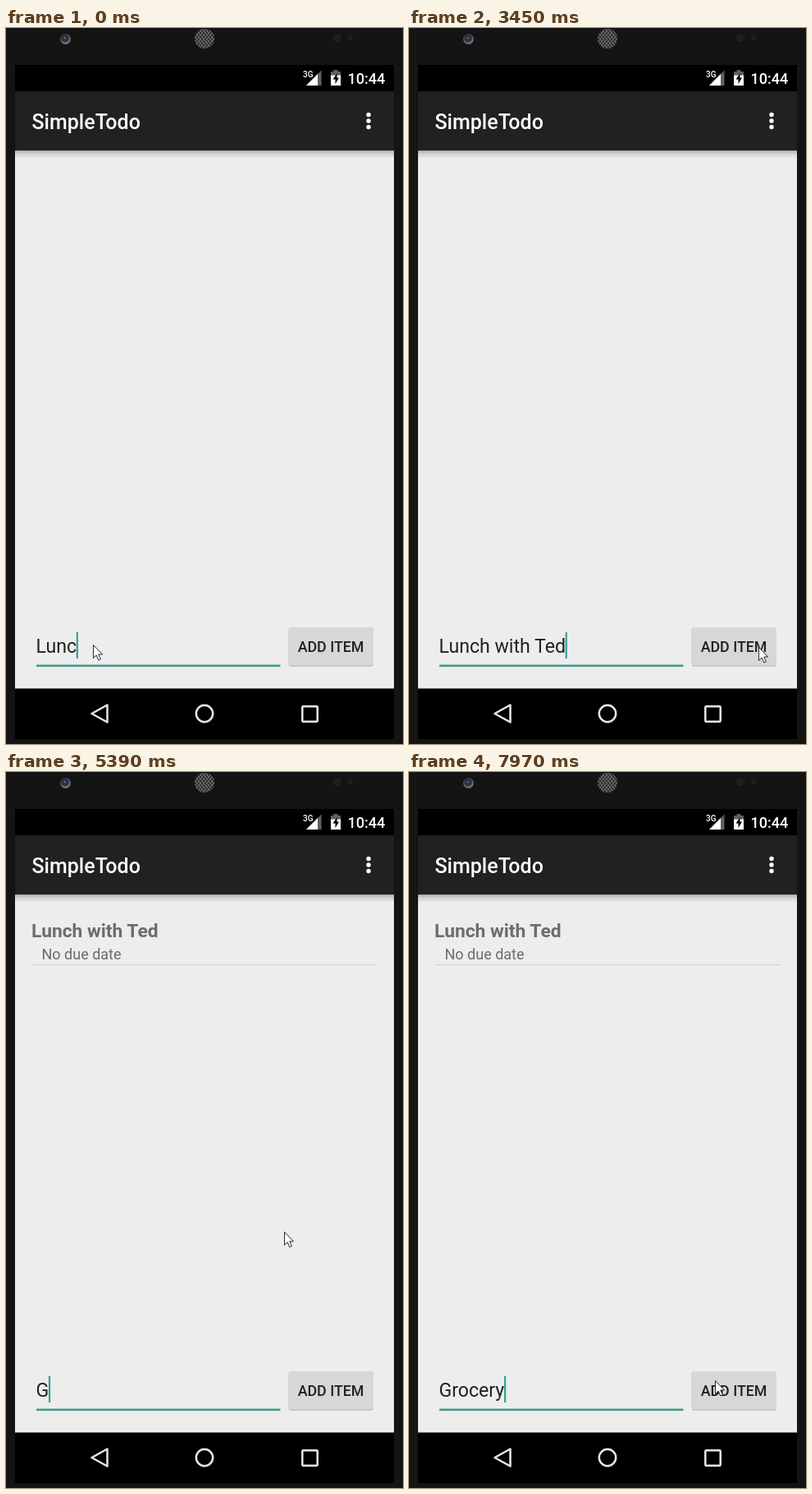
Recreate the animation shown at these times as an HTML page. Size 484 by 871 pixels, loop 8 s.

```html
<!DOCTYPE html>
<html lang="en">
<head>
<meta charset="utf-8">
<title>SimpleTodo</title>
<style>
html, body { margin: 0; width: 100%; height: 100%; overflow: hidden; background: #141414; }
svg { display: block; width: 484px; height: 871px; }
text { font-family: Roboto, "Noto Sans", sans-serif; white-space: pre; }
.medium { font-weight: 500; }
.field { font-size: 23.1px; }
</style>
</head>
<body>
<svg viewBox="0 0 484 871">
  <defs>
    <linearGradient id="shade" x2="0" y2="1">
      <stop stop-color="#aaa"/><stop offset=".4" stop-color="#d2d2d2"/><stop offset="1" stop-color="#ededed"/>
    </linearGradient>
    <radialGradient id="lens" cx=".45" cy=".4">
      <stop stop-color="#7474b4"/><stop offset=".35" stop-color="#26264a"/>
      <stop offset=".65" stop-color="#333"/><stop offset="1" stop-color="#77756f"/>
    </radialGradient>
    <pattern id="mesh" width="4" height="5" patternUnits="userSpaceOnUse">
      <path d="M0 0h4v5h-4z" fill="#646464"/>
      <g fill="#222"><circle cx="1" cy="1.2" r="1.15"/><circle cx="3" cy="3.7" r="1.15"/></g>
    </pattern>
  </defs>

  <!-- Phone body -->
  <rect width="484" height="871" fill="#141414"/>
  <circle cx="72.5" cy="13.5" r="6.3" fill="url(#lens)"/>
  <circle cx="242" cy="13" r="12" fill="url(#mesh)"/>
  <circle cx="404" cy="12" r="5" fill="#1f1f1f"/>
  <circle cx="420" cy="12" r="3" fill="#202020"/>

  <!-- Status bar and title bar -->
  <rect x="11" y="45" width="462" height="820"/>
  <text class="medium" x="362" y="60" font-size="10" fill="#fff">3G</text>
  <path d="M366 70L384.5 51.5V70z" fill="#606060"/>
  <path d="M366 70L380 56V70z" fill="#fff"/>
  <path d="M396 53h3.5v-2h5v2h3.5v5h-12z" fill="#606060"/>
  <path d="M396 57.5h12V70h-12z" fill="#fff"/>
  <path d="M403.5 55l-5 7.5h3v5.5l4.5-7.5h-2.5z"/>
  <text class="medium" x="416.5" y="68" font-size="18" fill="#fff">10:44</text>
  <rect x="11" y="77" width="462" height="72" fill="#212121"/>
  <text class="medium" x="31.5" y="122.5" font-size="25" fill="#fff">SimpleTodo</text>
  <g fill="#fff"><circle cx="442" cy="105.5" r="2.7"/><circle cx="442" cy="113" r="2.7"/><circle cx="442" cy="120.5" r="2.7"/></g>

  <!-- Content -->
  <rect x="11" y="149" width="462" height="654.5" fill="#ededed"/>
  <rect x="11" y="149" width="462" height="10" fill="url(#shade)"/>
  <g id="item" fill="#6c6c6c">
    <text x="31" y="200.5" font-size="22.8" font-weight="700">Lunch with Ted</text>
    <text x="43.5" y="227.5" font-size="18">No due date</text>
    <path d="M31.5 234.5H452.5" stroke="#d2d2d2"/>
  </g>
  <text id="hint" class="field" x="36.5" y="760" fill="#7c7c7c">New Item Here</text>
  <text id="typed" class="field" x="36.5" y="760" fill="#212121"></text>
  <rect x="37" y="774.5" width="297.5" height="2.6" fill="#45998d"/>
  <rect id="caret" y="735" width="2.2" height="32" fill="#36a195"/>
  <rect id="glow" x="344" y="731" width="104.5" height="47.5" rx="3" fill="#bbb"/>
  <rect x="344.5" y="730" width="103.5" height="46.8" rx="3" fill="#bdbdbd"/>
  <rect id="button" x="344.5" y="729" width="103.5" height="46.5" rx="3"/>
  <text class="medium" x="396" y="759" font-size="17.8" text-anchor="middle" fill="#202020">ADD ITEM</text>

  <!-- Navigation bar -->
  <g fill="none" stroke="#e6e6e6" stroke-width="2.5" stroke-linejoin="round">
    <path d="M104.5 834L123.5 823.5V844.5z"/>
    <circle cx="242" cy="834" r="10.2"/>
    <rect x="361.3" y="825.3" width="18.4" height="18.4" rx="1"/>
  </g>

  <path id="pointer" d="M.5 .5V16.5L4.2 13L6.8 19L9.4 17.8L6.8 12H11.5z" fill="#fff" stroke="#25253a" stroke-linejoin="round"/>
</svg>
<script>
const LOOP = 8000;
const $ = id => document.getElementById(id);
const [item, hint, typed, caret, glow, button, pointer] =
  ["item", "hint", "typed", "caret", "glow", "button", "pointer"].map($);

// Each track lists [start in ms, value]; values hold until the next start.
const typing = [
  [0, "Lunc"], [150, "Lunch"], [300, "Lunch "], [580, "Lunch w"], [730, "Lunch wit"],
  [1040, "Lunch with"], [1350, "Lunch with "], [1900, "Lunch with T"],
  [2200, "Lunch with Te"], [2480, "Lunch with Ted"], [3980, ""],
  [5390, "G"], [5670, "Gr"], [5950, "Gro"], [6070, "Groc"],
  [6350, "Groce"], [6470, "Grocer"], [6740, "Grocery"]
];
const caretShown = [
  [0, true], [1750, false], [1900, true], [2910, false], [3320, true],
  [4560, false], [4990, true], [7270, false], [7680, true]
];
const moves = [
  [0, [106, 750]], [2910, [150, 690]], [3050, [235, 656]], [3190, [330, 760]],
  [3320, [395, 853]], [3450, [426, 753]], [4120, [390, 665]], [4260, [346, 573]],
  [4410, [339, 559]], [7400, [345, 590]], [7540, [362, 665]],
  [7680, [379, 735]], [7970, [373, 740]]
];
const buttonFill = [
  [0, "#d6d7d7"], [3840, "#c9caca"], [4410, "#d0d1d1"], [4560, "#d6d7d7"]
];

const at = (track, t) => track.findLast(([start]) => start <= t)[1];
const show = (el, on) => el.setAttribute("visibility", on ? "visible" : "hidden");

function draw(now) {
  const t = now % LOOP;
  const text = at(typing, t);
  if (typed.textContent !== text) typed.textContent = text;
  caret.setAttribute("x", 36.7 + (text ? typed.getComputedTextLength() - .5 : 0));
  show(caret, at(caretShown, t));
  show(hint, !text);
  show(item, t >= 3980);
  show(glow, t >= 3840 && t < 4260);
  button.setAttribute("fill", at(buttonFill, t));
  pointer.setAttribute("transform", `translate(${at(moves, t)})`);
}

const start = performance.now();
function tick() {
  draw(performance.now() - start);
  requestAnimationFrame(tick);
}
tick();
</script>
</body>
</html>
```
